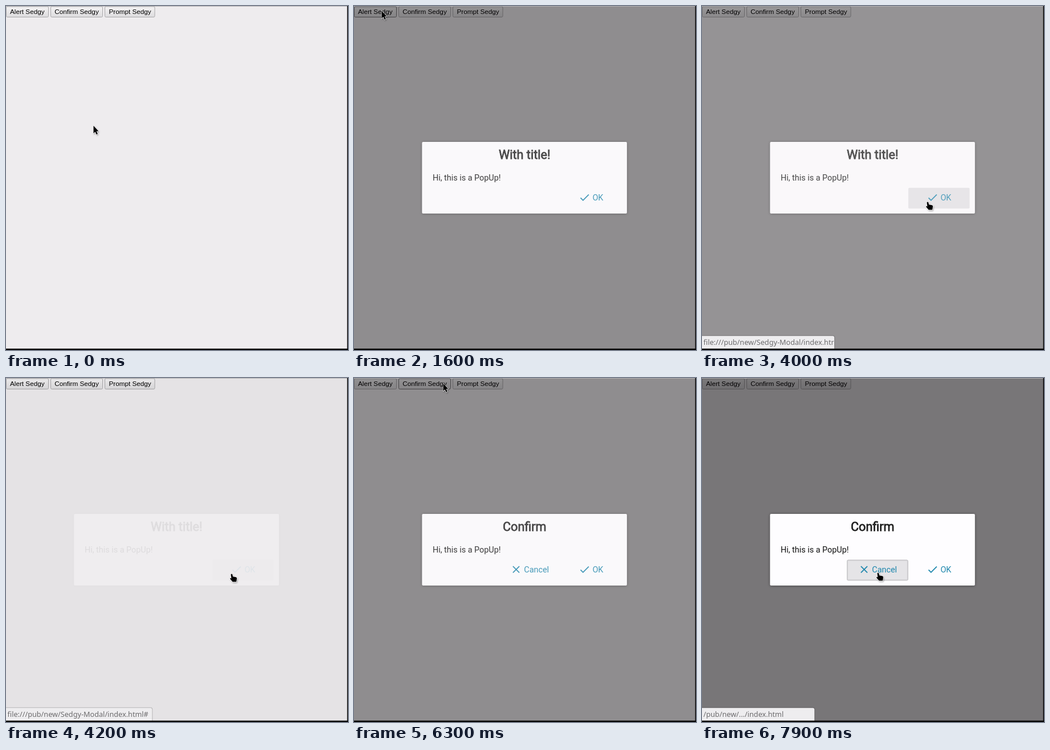
Animation of 600x605 px, one loop 8000 ms. Source, as an HTML page:

```html
<!DOCTYPE html>
<html lang="en">
<head>
<meta charset="utf-8">
<title>Popup demo</title>
<style>
  html, body { margin: 0; width: 100%; height: 100%; overflow: hidden; background: #eeecee; }
  svg { display: block; }
  text { white-space: pre; }
  .ui { font: 11.73px "Liberation Sans", Arial, sans-serif; text-anchor: middle; fill: #000; }
  .body { font: 14.4px Roboto, sans-serif; fill: #111; }
  .title { font: 21.6px Roboto, sans-serif; text-anchor: middle; fill: #212121; stroke: #212121; stroke-width: .8; }
  .link { fill: #1f87ad; }
  .status { font: 12.7px "Noto Sans", sans-serif; fill: #6c6b6d; }
</style>
</head>
<body>
<svg width="600" height="605" viewBox="0 0 600 605">
  <defs>
    <linearGradient id="face" x2="0" y2="1">
      <stop offset="0" stop-color="#f4f3f4"/><stop offset="1" stop-color="#dddcde"/>
    </linearGradient>
    <linearGradient id="down" x2="0" y2="1">
      <stop offset="0" stop-color="#d6d5d7"/><stop offset="1" stop-color="#e8e7e9"/>
    </linearGradient>
    <filter id="shade" x="-10%" y="-20%" width="120%" height="140%">
      <feDropShadow dx="0" dy=".5" stdDeviation="2.6" flood-color="#000" flood-opacity=".42"/>
    </filter>
    <filter id="soft" x="-50%" y="-50%" width="220%" height="220%">
      <feDropShadow dx="1" dy="1.4" stdDeviation=".8" flood-color="#000" flood-opacity=".35"/>
    </filter>
    <clipPath id="barClip"><rect id="barClipBox" y="578" width="197" height="25"/></clipPath>
  </defs>

  <rect width="600" height="605" fill="#eeecee"/>
  <rect width="600" height="1" fill="#b3b2b4"/>
  <g id="buttons"></g>

  <g id="popup">
    <rect y="1" width="600" height="604" fill="#040204" opacity=".5"/>
    <rect x="119.4" y="239" width="359.4" height="126" rx="2" fill="#fefdff" filter="url(#shade)"/>
    <text id="title" class="title" x="299.3" y="269.4"></text>
    <text class="body" x="137.9" y="307.2">Hi, this is a PopUp!</text>
    <rect id="hot" y="319.7" width="107.5" height="36.6" rx="2" fill="#e5e4e7"/>
    <g id="inset" fill="none">
      <rect x="1" y="320.7" width="105.5" height="34.6" rx="1.5" stroke="#d6d5d8" stroke-width="2"/>
      <rect x=".5" y="320.2" width="106.5" height="35.6" rx="2" stroke="#c4c3c6"/>
    </g>
    <g id="cancel" class="link">
      <path transform="translate(273.8 326.1) scale(.89)" d="M19 6.41 17.59 5 12 10.59 6.41 5 5 6.41 10.59 12 5 17.59 6.41 19 12 13.41 17.59 19 19 17.59 13.41 12z"/>
      <text class="body link" x="298.3" y="342.1">Cancel</text>
    </g>
    <g class="link">
      <path transform="translate(393.8 326.1) scale(.89)" d="M9 16.17 4.83 12l-1.42 1.41L9 19 21 7l-1.41-1.41z"/>
      <text class="body link" x="418.4" y="342.1">OK</text>
    </g>
  </g>

  <g id="status">
    <path id="bar" fill="#eeedef" stroke="#000" stroke-opacity=".2" stroke-width="2" paint-order="stroke"/>
    <text id="path" class="status" x="2.5" y="595.8" clip-path="url(#barClip)"></text>
  </g>

  <rect x="598.6" width="1.4" height="605"/>
  <rect y="602.6" width="600" height="2.4"/>

  <g id="cursor" filter="url(#soft)" stroke="#fff" stroke-width="1.1" stroke-linejoin="round" paint-order="stroke">
    <path id="arrow" d="M.5 .5V14L3.5 11.2 5.7 16 7.9 15 5.7 10.3H9.4z"/>
    <path id="hand" d="M-1.5 1.6Q-.2-.4 1.2 1.4L2 5.2 7.4 6.2Q9 6.6 9 8.6L8.6 11.6 8 14.6H1.6L-2.6 9.6Q-3.4 7.5-1.8 7.8L-.6 8.8z"/>
  </g>
</svg>
<script>
const LOOP = 8000;
const $ = id => document.getElementById(id);
const set = (el, attrs) => { for (const k in attrs) el.setAttribute(k, attrs[k]); };
const show = (el, on) => set(el, { visibility: on ? 'inherit' : 'hidden' });
const clamp = v => Math.min(1, Math.max(0, v));
const ramp = (t, from, span) => clamp((t - from) / span);
const within = (t, a, b) => t >= a && t < b;
const smooth = p => p * p * (3 - 2 * p);

// cubic-bezier(.25, .1, .25, 1)
function ease(p) {
  if (p <= 0 || p >= 1) return clamp(p);
  const bez = (u, a, b) => 3 * a * u * (1 - u) ** 2 + 3 * b * u * u * (1 - u) + u ** 3;
  let lo = 0, hi = 1;
  for (let i = 0; i < 24; i++) {
    const mid = (lo + hi) / 2;
    if (bez(mid, .25, .25) < p) lo = mid; else hi = mid;
  }
  return bez(lo, .1, 1);
}

const pageButtons = [
  { x: .5, w: 74, cx: 37.3, label: 'Alert Sedgy', press: [1300, 1400] },
  { x: 78.5, w: 91, cx: 124, label: 'Confirm Sedgy', press: [6000, 6090] },
  { x: 173.5, w: 87.5, cx: 217.6, label: 'Prompt Sedgy', press: [0, 0] }
];

function make(tag, attrs) {
  const el = document.createElementNS('http://www.w3.org/2000/svg', tag);
  set(el, attrs);
  return $('buttons').appendChild(el);
}
for (const b of pageButtons) {
  b.box = make('rect', { x: b.x, y: 1, width: b.w, height: 18.5, rx: 2 });
  make('text', { class: 'ui', x: b.cx, y: 14.3 }).textContent = b.label;
}

const popups = [
  { title: 'With title!', open: 1400, close: 3930, press: [3820, 3930] },
  { title: 'Confirm', open: 6100, close: 9000, press: [7800, 8000] }
];
const bars = [
  { open: 2730, grow: 3900, close: 4600 },
  { open: 7480, grow: 9000, close: 9000 }
];
const FADE = 400;
const SHORT = '/pub/new/.../index.html';
const FULL = 'file:///pub/new/Sedgy-Modal/index.html#';

// time, x, y
const route = [
  [0, 153, 210], [150, 153, 210], [1250, 48, 8], [1850, 48, 8], [2720, 396, 344],
  [4600, 396, 344], [5420, 215, 13], [5480, 215, 13], [5720, 156, 9],
  [6850, 156, 9], [7550, 309, 342], [LOOP, 309, 342]
];

function pointerAt(t) {
  const i = Math.max(1, route.findIndex(r => r[0] > t));
  const [t0, x0, y0] = route[i - 1], [t1, x1, y1] = route[i];
  const p = smooth(ramp(t, t0, t1 - t0));
  return [x0 + (x1 - x0) * p, y0 + (y1 - y0) * p];
}

function drawPopup(t, x, y) {
  const pop = popups.find(p => within(t, p.open, p.close + FADE));
  show($('popup'), pop);
  for (const id of ['hot', 'inset', 'cancel']) show($(id), false);
  if (!pop) return false;

  const alpha = ease(ramp(t, pop.open, FADE)) * (1 - ease(ramp(t, pop.close, FADE)));
  const two = pop === popups[1];
  set($('popup'), { opacity: alpha });
  $('title').textContent = pop.title;
  show($('cancel'), two);

  const inRow = y > 320 && y < 356;
  const left = inRow && x >= 362 && x < 469.5 ? 362 : inRow && two && x >= 254 && x < 362 ? 254.2 : 0;
  show($('hot'), left);
  show($('inset'), left && within(t, ...pop.press));
  set($('hot'), { x: left });
  set($('inset'), { transform: `translate(${left} 0)` });
  return left > 0;
}

function drawStatus(t) {
  const bar = bars.find(b => within(t, b.open, b.close + 200));
  show($('status'), bar);
  if (!bar) return;
  const w = 197.3 + 59 * smooth(ramp(t, bar.grow, 180));
  set($('status'), { opacity: ramp(t, bar.open, 130) * (1 - ramp(t, bar.close, 200)) });
  set($('bar'), { d: `M-2 580.3H${w - 3}Q${w} 580.3 ${w} 583.3V606H-2z` });
  set($('barClipBox'), { width: w - 1 });
  $('path').textContent = t < bar.grow ? SHORT : FULL;
}

function draw(t) {
  const [x, y] = pointerAt(t);
  for (const b of pageButtons) {
    const over = y > 1 && y < 19.5 && x > b.x && x < b.x + b.w;
    const fill = within(t, ...b.press) ? 'url(#down)' : 'url(#face)';
    set(b.box, { fill, stroke: over ? '#727173' : '#a9a8aa' });
  }
  const onLink = drawPopup(t, x, y);
  drawStatus(t);
  set($('cursor'), { transform: `translate(${x} ${y})` });
  show($('hand'), onLink);
  show($('arrow'), !onLink);
}

const start = performance.now();
function tick() {
  draw((performance.now() - start) % LOOP);
  requestAnimationFrame(tick);
}
tick();
</script>
</body>
</html>
```
